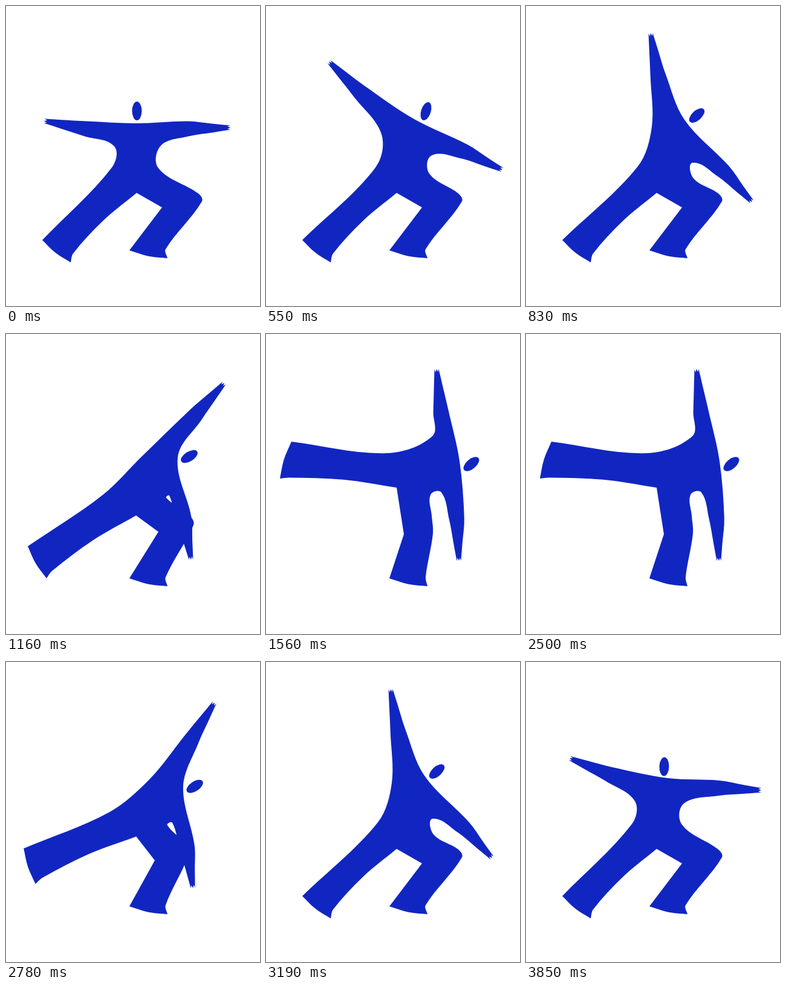
Write an HTML page with a canvas that moves like this. It is 420 px wide and 496 px high and loops after 3970 ms.

```html
<!DOCTYPE html>
<html lang="en">
<head>
<meta charset="utf-8">
<title>Stretching figure</title>
<style>
html, body { margin: 0; width: 100%; height: 100%; overflow: hidden; background: #fff; }
canvas { display: block; }
</style>
</head>
<body>
<canvas id="stage" width="420" height="496"></canvas>
<script>
const ctx = document.getElementById('stage').getContext('2d');
const LOOP = 3970;
const TOE = [204, 404], HEEL = [267, 417];

const lunge = { thigh: [318, 310], knee: [324, 323], bend: [258, 333], crotch: [216, 309],
  backHeel: [107, 424], backToe: [60, 387] };
const reach = { thigh: [306, 303], knee: [310, 316], bend: [252, 327], crotch: [215, 300],
  backHeel: [67, 404], backToe: [36, 351] };
const level = { thigh: [274, 300], knee: [276, 330], bend: [228, 331], crotch: [216, 254],
  backHeel: [23, 239], backToe: [42, 178] };
const kick = { thigh: [274, 320], knee: [268, 357], bend: [223, 325], crotch: [225, 238],
  backHeel: [114, 125], backToe: [149, 82] };

// A is the arm above the back leg, B the one above the front leg.
const poses = [
  { ...lunge, head: [216.5, 173.5], tilt: 0, neck: [215, 194], tipA: [63, 190], tipB: [371, 201],
    pitA: [179, 232], waist: [175, 267], pitB: [256, 231], hip: [252, 268] },
  { ...lunge, head: [228.5, 173], tilt: 2, neck: [235, 192], tipA: [72, 159], tipB: [389, 212],
    pitA: [180, 230], waist: [175, 268], pitB: [261, 234], hip: [258, 269] },
  { ...lunge, head: [264.5, 174], tilt: 18, neck: [245, 187], tipA: [104, 92], tipB: [391, 271],
    pitA: [191, 212], waist: [181, 267], pitB: [274, 247], hip: [270, 277] },
  { ...lunge, head: [282.5, 181], tilt: 48, neck: [262, 188], tipA: [206, 45], tipB: [374, 324],
    pitA: [208, 200], waist: [185, 265], pitB: [276, 259], hip: [277, 285] },
  { ...reach, head: [303, 202.5], tilt: 58, neck: [284, 204], tipA: [361, 81], tipB: [306, 373],
    pitA: [225, 202], waist: [160, 266], pitB: [270, 267], hip: [265, 271] },
  { ...level, head: [339.5, 215], tilt: 50, neck: [320, 210], tipA: [282, 58], tipB: [319, 375],
    pitA: [275, 169], waist: [200, 197], pitB: [290, 262], hip: [272, 266] },
  { ...kick, head: [363, 239], tilt: 98, neck: [343, 235], tipA: [361, 78], tipB: [339, 389],
    pitA: [297, 203], waist: [240, 167], pitB: [302, 277], hip: [281, 282] }
];

// Time, pose, number of steps to the next pose.
const timeline = [
  [0, 0, 1], [130, 1, 4], [550, 2, 2], [830, 3, 3], [1160, 4, 4], [1550, 5, 4], [1970, 6, 4],
  [2500, 5, 4], [2860, 4, 3], [3190, 3, 2], [3470, 2, 3], [3850, 1, 1], [LOOP, 0, 1]
];

// Hands and the back foot swing about these joints.
const joints = { tipA: 'neck', tipB: 'neck', backHeel: 'crotch', backToe: 'crotch' };

const mix = (a, b, k) => a + (b - a) * k;
const mixPoint = (p, q, k) => [mix(p[0], q[0], k), mix(p[1], q[1], k)];
const sub = (p, q) => [p[0] - q[0], p[1] - q[1]];
const unit = ([x, y]) => { const d = Math.hypot(x, y) || 1; return [x / d, y / d]; };
// Point at a distance along direction u from p, and across it to the left.
const offset = (p, u, along, across) =>
  [p[0] + u[0] * along + u[1] * across, p[1] + u[1] * along - u[0] * across];

function swing(a, b, name, joint, k) {
  const [ax, ay] = sub(a[name], a[joint]), [bx, by] = sub(b[name], b[joint]);
  const from = Math.atan2(ay, ax);
  let delta = Math.atan2(by, bx) - from;
  delta -= 2 * Math.PI * Math.round(delta / (2 * Math.PI));
  const angle = from + delta * k;
  const radius = mix(Math.hypot(ax, ay), Math.hypot(bx, by), k);
  const [x, y] = mixPoint(a[joint], b[joint], k);
  return [x + radius * Math.cos(angle), y + radius * Math.sin(angle)];
}

function blend(a, b, k) {
  const pose = { tilt: mix(a.tilt, b.tilt, k) };
  for (const name in a) {
    if (joints[name]) pose[name] = swing(a, b, name, joints[name], k);
    else if (name !== 'tilt') pose[name] = mixPoint(a[name], b[name], k);
  }
  return pose;
}

// A tapering arm: one edge from wrist to elbow, and a hand with three fingers.
function arm(tip, shoulder) {
  const u = unit(sub(shoulder, tip));
  const at = (s, side) => offset(tip, u, s, side * (3.5 + s * 0.13));
  return {
    edge: side => [5, 28, 70].map(s => at(s, side)),
    hand: [0, 1, 2, 3, 4].map(i => at(i % 2 ? 5 : 0, i / 2 - 1))
  };
}

// A flared trouser end: ankle above the heel, bowed sole.
function foot(toe, heel) {
  const u = unit(sub(heel, toe));
  return { ankle: offset(heel, u, -6, 14), sole: [heel, offset(mixPoint(toe, heel, 0.5), u, 0, -3), toe] };
}

// Smooth curve through the points, starting from the first.
function curve(pts) {
  const tangent = i => unit(sub(pts[Math.min(i + 1, pts.length - 1)], pts[Math.max(i - 1, 0)]));
  ctx.lineTo(...pts[0]);
  for (let i = 1; i < pts.length; i++) {
    const p = pts[i - 1], q = pts[i];
    const h = Math.hypot(...sub(q, p)) / 3;
    ctx.bezierCurveTo(...offset(p, tangent(i - 1), h, 0), ...offset(q, tangent(i), -h, 0), ...q);
  }
}

const lines = pts => pts.forEach(p => ctx.lineTo(...p));

function draw(f) {
  const armA = arm(f.tipA, mixPoint(f.neck, f.pitA, 0.55));
  const armB = arm(f.tipB, mixPoint(f.neck, f.pitB, 0.3));
  const front = foot(TOE, HEEL), back = foot(f.backToe, f.backHeel);
  const calf = offset(mixPoint(f.crotch, back.ankle, 0.5), unit(sub(back.ankle, f.crotch)), 0, -5);

  ctx.fillStyle = '#fff';
  ctx.fillRect(0, 0, 420, 496);
  ctx.fillStyle = '#1126c1';
  ctx.beginPath();
  curve([...armA.edge(1), f.neck, ...armB.edge(-1).reverse()]);
  lines(armB.hand);
  curve([...armB.edge(1), f.pitB, f.hip, f.thigh, f.knee, front.ankle, HEEL]);
  curve(front.sole);
  lines([f.bend, f.crotch]);
  curve([f.crotch, calf, back.ankle, f.backHeel]);
  curve(back.sole);
  curve([f.backToe, f.waist, f.pitA, ...armA.edge(-1).reverse()]);
  lines(armA.hand);
  ctx.fill();

  ctx.beginPath();
  ctx.ellipse(...f.head, 8, 15.5, f.tilt * Math.PI / 180, 0, 2 * Math.PI);
  ctx.fill();
}

function frame(now) {
  const t = Math.max(0, now) % LOOP;
  const n = timeline.findIndex(key => key[0] > t);
  const [start, from, steps] = timeline[n - 1], [end, to] = timeline[n];
  const k = Math.floor((t - start) / (end - start) * steps + 1e-6) / steps;
  draw(blend(poses[from], poses[to], k));
  requestAnimationFrame(frame);
}
frame(0);
</script>
</body>
</html>
```
